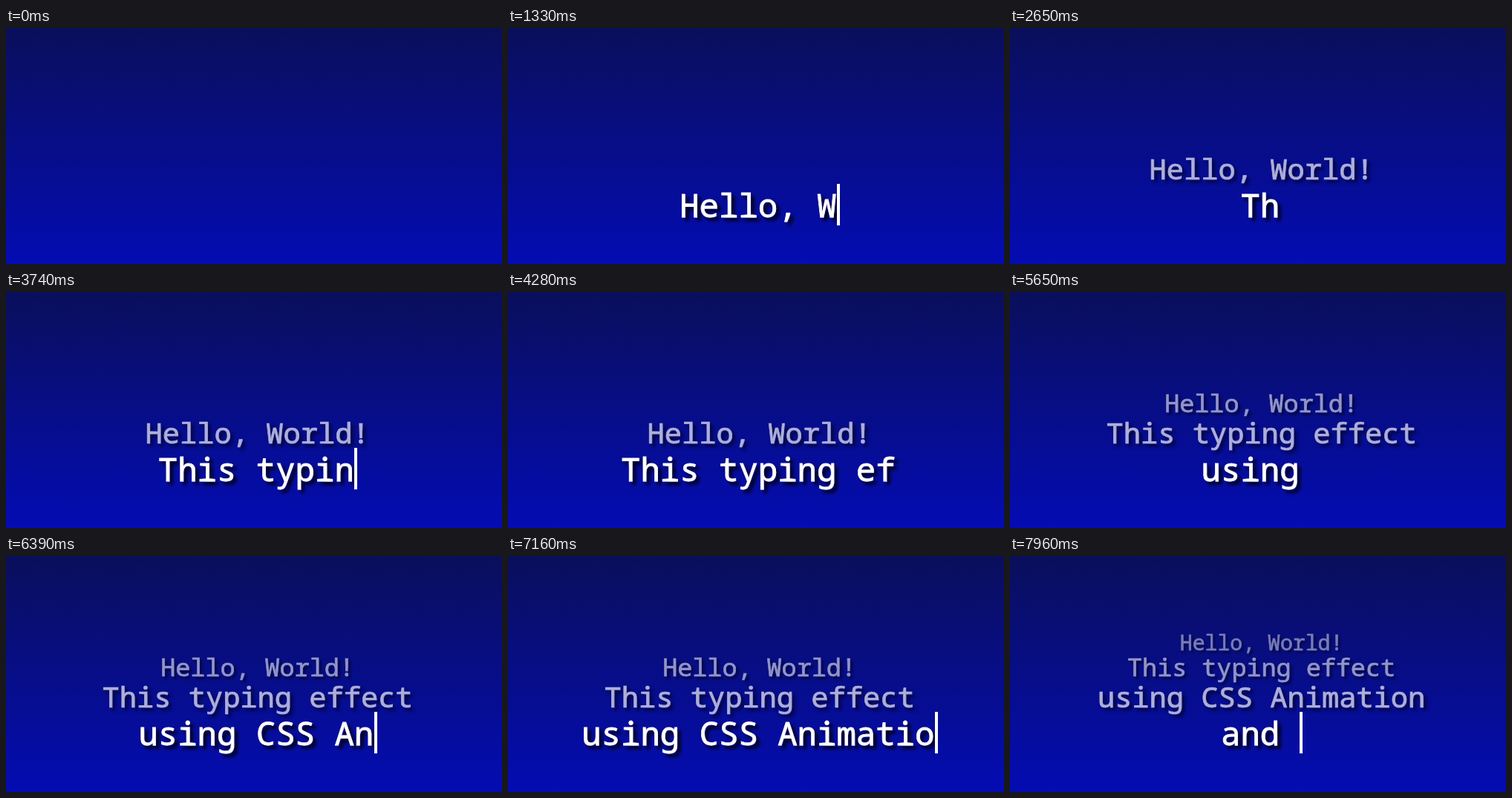
An HTML page for the animation above (8 s loop, 668 by 318 pixels).

```html
<!DOCTYPE html>
<html lang="en">
<head>
<meta charset="utf-8">
<title>Typing effect</title>
<style>
html, body { margin: 0; width: 100%; height: 100%; overflow: hidden; background: #060c86; }
svg { display: block; }
text {
  font: 44px "Noto Sans Mono", monospace;
  font-variant-ligatures: none;
  white-space: pre;
  fill: #fff;
  stroke: #fff;
  stroke-width: .8px;
}
</style>
</head>
<body>
<svg id="stage" width="668" height="318" viewBox="0 0 668 318">
  <defs>
    <linearGradient id="sky" x1="0" y1="0" x2="0" y2="1">
      <stop offset="0" stop-color="#0a0f5b"/>
      <stop offset="1" stop-color="#040cb3"/>
    </linearGradient>
    <filter id="shade" filterUnits="userSpaceOnUse" x="-400" y="-60" width="800" height="100">
      <feDropShadow dx="4.5" dy="4.5" stdDeviation="2.2" flood-color="#000" flood-opacity=".9"/>
    </filter>
  </defs>
  <rect width="668" height="318" fill="url(#sky)"/>
  <g id="lines"></g>
  <rect id="caret" y="210" width="4" height="56" fill="#fff"/>
</svg>
<script>
const LOOP = 8000, CHAR = 26.4;
const BLINK = 818, BLINK_START = 280;

// show: line becomes current; start + n * step: n characters typed
const lines = [
  { text: "Hello, World!", show: -90, start: -83, step: 173 },
  { text: "This typing effect", show: 2380, start: 2380, step: 134 },
  { text: "using CSS Animation", show: 4930, start: 4904, step: 122.4 },
  { text: "and ", show: 7370, start: 7370, step: 147 }
];

// Looks by age, newest first
const levels = [
  { x: 336.8, y: 254.5, scale: 1, opacity: 1 },
  { x: 338.6, y: 203.5, scale: .88, opacity: .67 },
  { x: 338.6, y: 161.5, scale: .76, opacity: .56 },
  { x: 338.6, y: 126.5, scale: .64, opacity: .46 }
];

const NS = "http://www.w3.org/2000/svg";
const holder = document.getElementById("lines");
const caret = document.getElementById("caret");

for (const line of lines) {
  line.group = holder.appendChild(document.createElementNS(NS, "g"));
  line.group.setAttribute("filter", "url(#shade)");
  line.label = line.group.appendChild(document.createElementNS(NS, "text"));
}

function typed(line, t) {
  const n = Math.floor((t - line.start) / line.step);
  return Math.max(0, Math.min(line.text.length, n));
}

function draw(t) {
  const current = lines.filter(line => t >= line.show).length - 1;
  lines.forEach((line, i) => {
    const age = current - i;
    line.group.style.display = age < 0 ? "none" : "";
    if (age < 0) return;
    const { x, y, scale, opacity } = levels[age];
    const n = age ? line.text.length : typed(line, t);
    line.label.textContent = line.text.slice(0, n);
    line.label.setAttribute("x", -n * CHAR / 2);
    line.group.setAttribute("transform", `translate(${x} ${y}) scale(${scale})`);
    line.group.setAttribute("opacity", opacity);
    if (!age) caret.setAttribute("x", Math.round(x + n * CHAR / 2 + .6));
  });
  const phase = (t - BLINK_START + BLINK) % BLINK;
  caret.style.display = phase < BLINK / 2 && t >= BLINK_START ? "" : "none";
}

let begin;
function tick(now) {
  begin ??= now;
  draw((now - begin) % LOOP);
  requestAnimationFrame(tick);
}
draw(0);
requestAnimationFrame(tick);
</script>
</body>
</html>
```
